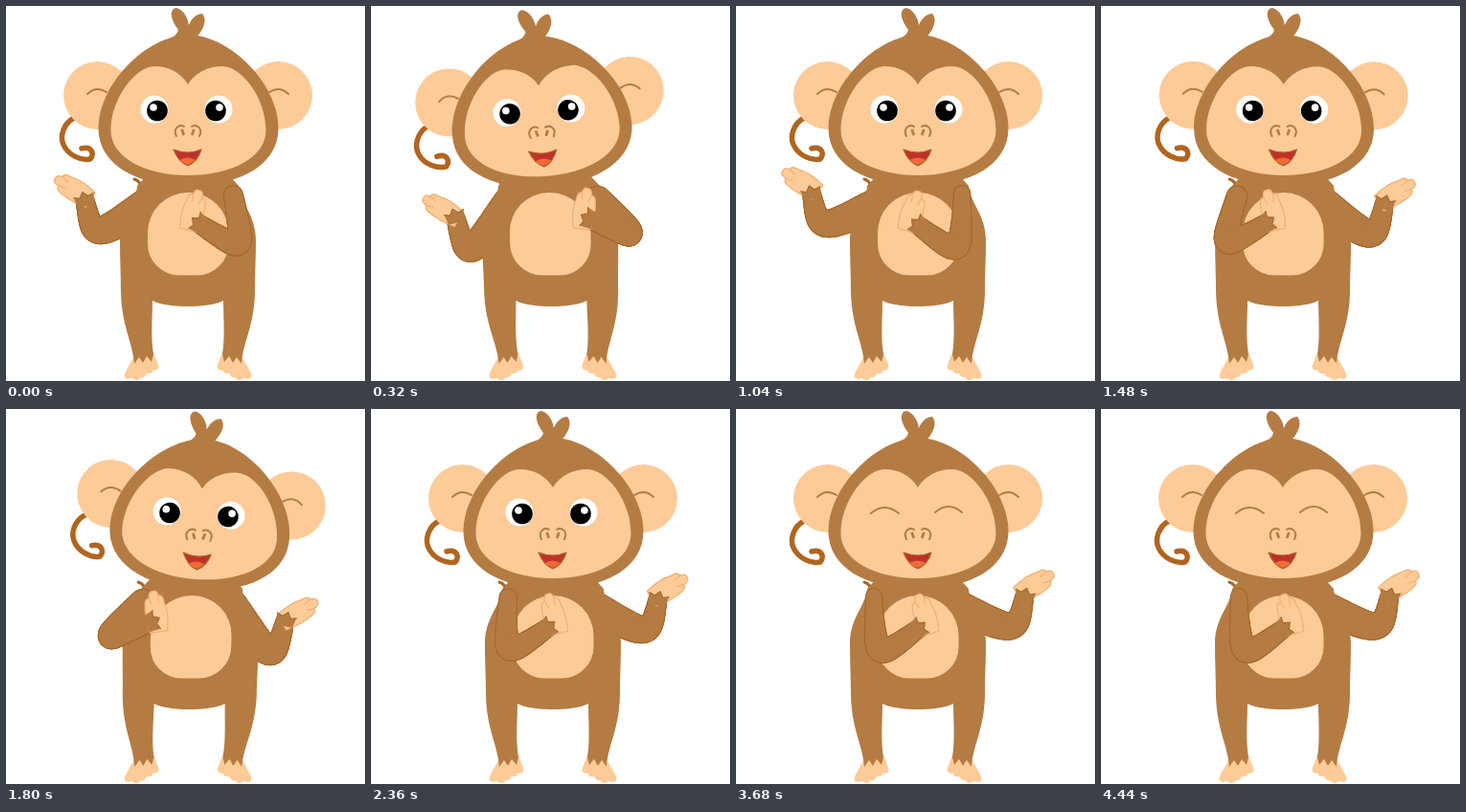
Recreate the animation shown at these times as an HTML page with a canvas. Size 375 px wide and 392 px high, loop 4.52 s.

```html
<!DOCTYPE html>
<html lang="en">
<head>
<meta charset="utf-8">
<title>Monkey</title>
<style>
  html, body { margin: 0; width: 100%; height: 100%; overflow: hidden; background: #fff; }
  canvas { display: block; }
</style>
</head>
<body>
<canvas id="stage" width="375" height="392"></canvas>
<script>
const ctx = document.getElementById('stage').getContext('2d');
const LOOP = 4520, STEP = 40, TURN = 1320, LAUGH = 2880, SWING = 1240;
const BROWN = '#b47c43', SKIN = '#fdcb98', DARK = '#a9672a', RIM = '#f3b074';
const CENTER = 190;

function ease(u) {
  u = Math.min(1, Math.max(0, u));
  return u * u * (3 - 2 * u);
}

function shape(d, fill, stroke, width = 2) {
  const path = new Path2D(d);
  if (fill) { ctx.fillStyle = fill; ctx.fill(path); }
  if (stroke) { ctx.strokeStyle = stroke; ctx.lineWidth = width; ctx.stroke(path); }
}

function dot(x, y, r, color) {
  ctx.fillStyle = color;
  ctx.beginPath();
  ctx.arc(x, y, r, 0, 7);
  ctx.fill();
}

function group(draw) {
  ctx.save();
  draw();
  ctx.restore();
}

function flip() {
  ctx.transform(-1, 0, 0, 1, 2 * CENTER, 0);
}

function both(draw) {
  draw();
  group(() => { flip(); draw(); });
}

function drawHand([x, y], deg) {
  group(() => {
    ctx.translate(x, y);
    ctx.rotate(deg * Math.PI / 180);
    shape('M-4-9Q12-13 26-11Q33-10 32-6Q40-6 39-1Q40 3 34 4Q34 9 26 9Q14 13-4 9Z', SKIN, RIM, 1.3);
    shape('M32-6L25-4M34 4L26 3', null, RIM, 1.2);
  });
}

function drawArm({ shoulder, radius, elbow, wrist, hand, angle }) {
  // Control point that makes the curve pass through the elbow
  const bend = elbow.map((e, i) => (e - (shoulder[i] + wrist[i]) / 8) / .75);
  const at = (i, u) => shoulder[i] * (1 - u) ** 3 + 3 * bend[i] * u * (1 - u) + wrist[i] * u ** 3;
  for (const [grow, color] of [[1.2, DARK], [0, BROWN]]) {
    for (let u = 0; u <= 1; u += 1 / 64) {
      const r = u < .5 ? radius + (13 - radius) * u * 2 : 13 - (u - .5) * 8;
      dot(at(0, u), at(1, u), r + grow, color);
    }
  }
  drawHand(hand, angle);
  group(() => {
    ctx.translate(...wrist);
    ctx.rotate(Math.atan2(wrist[1] - bend[1], wrist[0] - bend[0]));
    shape('M-5-9L6-11 4-5 10-1 5 4 7 10-5 9Z', BROWN);
    shape('M6-11L4-5 10-1 5 4 7 10', null, DARK, 1.2);
  });
}

// Both poses are for the left side; s swings them down and outwards
const raisedArm = s => drawArm({
  shoulder: [147, 207], radius: 16, elbow: [93 + 14 * s, 227 + 27 * s],
  wrist: [79 + 13 * s, 197 + 25 * s], hand: [82 + 10 * s, 192 + 29 * s], angle: -147
});
const chestArm = s => drawArm({
  shoulder: [144 - 5 * s, 196 + 6 * s], radius: 8 + 5 * s, elbow: [151 - 44 * s, 251 - 14 * s],
  wrist: [190 - 42 * s, 230 - 7 * s], hand: [202 - 46 * s, 231 - 2 * s], angle: -106 + 8 * s
});

function drawBody() {
  both(() => {
    shape('M135 364L125 382Q121 390 128 390Q132 388 133 390Q138 393 141 388Q145 389 147 384Q153 385 153 381Q161 381 159 375L154 362Z', SKIN);
    shape('M192 178H146L137 188C136 205 119 218 119 245C119 265 120 280 120 300C121 335 132 350 134 374L139 367 143 373 147 366 152 372 154 364C151 345 153 325 153 308Q165 314 192 314Z', BROWN);
  });
  ctx.fillStyle = SKIN;
  ctx.beginPath();
  ctx.roundRect(148, 195, 84.5, 86.5, [42, 42, 33, 33]);
  ctx.fill();
}

function drawEyes(closed) {
  if (closed) {
    shape('M141 109Q155 97 170 109M208 108Q222 96 236 108', null, BROWN);
    return;
  }
  for (const [x, inward] of [[155, 1], [222, -1]]) {
    dot(x, 108, 14.5, '#fff');
    dot(x + 3 * inward, 109.5, 10.8, '#000');
    dot(x - inward, 106, 3.8, '#fff');
  }
}

function drawHead(closed) {
  shape('M71 117C60 123 56 136 60 145C65 156 78 162 88 160C93 154 89 146 79 149', null, '#b0651f', 5.5);
  both(() => {
    dot(95.5, 93.5, 35.5, SKIN);
    shape('M85 92Q94 83 105 90', null, BROWN);
  });
  shape('M166 36Q179 32 180 25C177 21 174 16 173 11C172 5 175 2 178 2C186 4 190 13 191 20C194 12 200 8 205 8C211 15 206 26 196 36Z', BROWN);
  shape('M190.5 30C146 31 96.5 82 96.5 128C96.5 165 135 188 190.5 188C246 188 284.5 165 284.5 128C284.5 82 235 31 190.5 30Z', BROWN);
  shape('M190 82C183 70 170 63 155 63C136 63 109.5 96 109.5 130C109.5 158 145 177 190 177C236 177 271.5 158 271.5 130C271.5 96 246 63 226 63C211 63 197 70 190 82Z', SKIN);
  drawEyes(closed);
  both(() => {
    shape('M178 136C174 128 181 123 186 126', null, BROWN);
    shape('M184 130L185.5 134', null, BROWN, 2.8);
  });
  shape('M175 150Q190 156 204 150Q200 163 190 167Q180 163 175 150Z', '#c0302a', DARK, 1.2);
  shape('M181 161Q190 156 198 161Q194 165 190 166Q185 165 181 161Z', '#ef6a35');
}

function draw(t) {
  // One swing to the left, then its mirror image to the right
  const side = t < TURN ? -1 : 1;
  const u = Math.min(SWING, t < TURN ? t + 120 : t - TURN);
  const swing = Math.sin(Math.PI * (u / SWING) ** .73) ** 2;
  const lean = side * ease((u - 120) / 300) * (1 - ease((u - 500) / 440));
  const closed = t >= LAUGH || u >= 600 && u < 900;
  const arm = (pose, mirrored) => group(() => {
    if (mirrored) flip();
    pose(swing);
  });

  ctx.fillStyle = '#fff';
  ctx.fillRect(0, 0, 375, 392);
  group(() => {
    ctx.transform(1, 0, -.02 * lean, 1, .02 * 390 * lean, 0);
    shape('M134 181Q141 183 141 191', null, DARK, 3);
    arm(raisedArm, side > 0);
    drawBody();
    arm(chestArm, side < 0);
  });
  group(() => {
    ctx.translate(CENTER + 8 * lean, 185 + Math.abs(lean));
    ctx.rotate(.066 * lean);
    ctx.translate(-CENTER, -185);
    drawHead(closed);
  });
}

ctx.lineCap = ctx.lineJoin = 'round';
const start = performance.now();
function tick() {
  const t = (performance.now() - start) % LOOP;
  draw(Math.floor(t / STEP) * STEP);
  requestAnimationFrame(tick);
}
tick();
</script>
</body>
</html>
```
